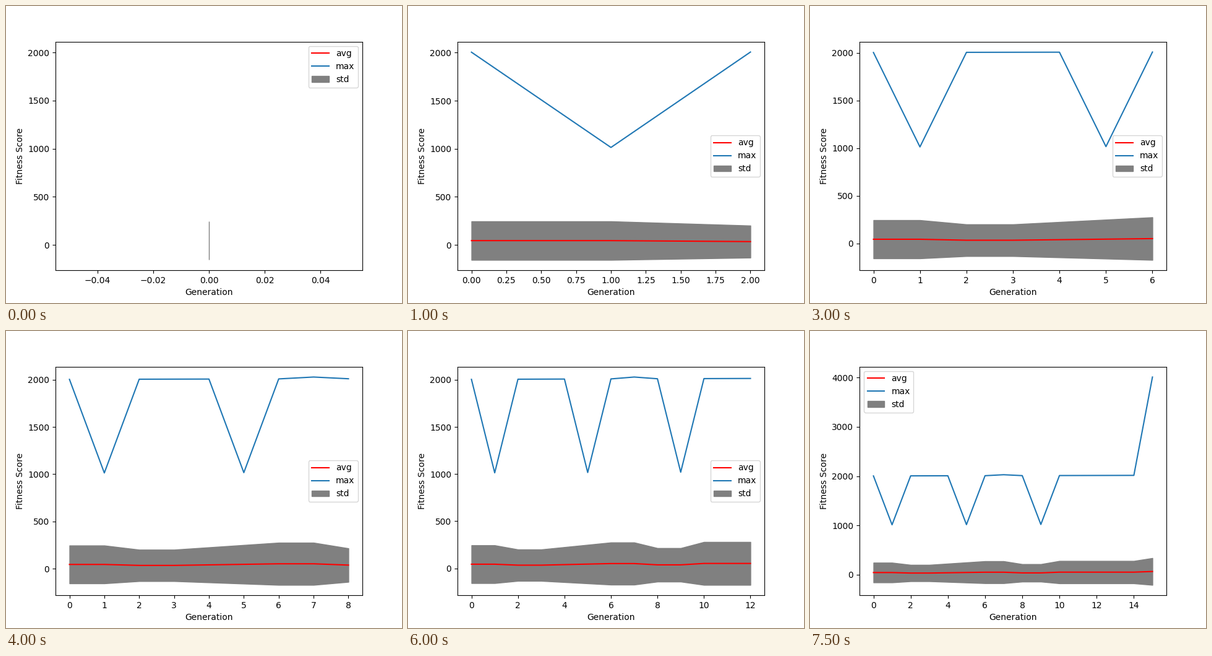
Animation, 640 px wide and 480 px high, one loop 8000 ms. Source, as a matplotlib script:

```python
import matplotlib.pyplot as plt
import numpy as np
from matplotlib.animation import FuncAnimation

GENERATIONS = 16
gens = np.arange(GENERATIONS)

# The spread holds a level for a few generations, then ramps to the next:
# (first generation, last generation, level)
PLATEAUS = [(0, 1, 201), (2, 3, 167), (6, 7, 224),
            (8, 9, 178), (10, 14, 228), (14.99, 15, 273)]
knots = [g for first, last, _ in PLATEAUS for g in (first, last)]
levels = [level for *_, level in PLATEAUS for _ in range(2)]
std = np.interp(gens, knots, levels)

# The average follows the spread
avg = 0.3 * std - 16

# The best score creeps up, drops every fourth generation early on,
# peaks slightly at 7 and doubles at the end
best = 2005 + 0.8 * gens
best[1:10:4] -= 992
best[7] += 19
best[-1] += 1995

plt.rcParams["font.family"] = "DejaVu Sans"
fig, ax = plt.subplots(figsize=(6.4, 4.8), dpi=100)


def draw(last):
    """Plot all generations up to and including the last one."""
    ax.clear()
    x, mid, dev, top = (v[:last + 1] for v in (gens, avg, std, best))
    ax.plot(x, mid, color="red", label="avg")
    ax.plot(x, top, color="tab:blue", label="max")
    ax.fill_between(x, mid - dev, mid + dev, color="gray", label="std")
    ax.set_xlabel("Generation")
    ax.set_ylabel("Fitness Score")
    ax.legend(loc="best")


anim = FuncAnimation(fig, draw, frames=GENERATIONS, interval=500,
                     init_func=lambda: draw(0), repeat=True, repeat_delay=0)
plt.show()
```
